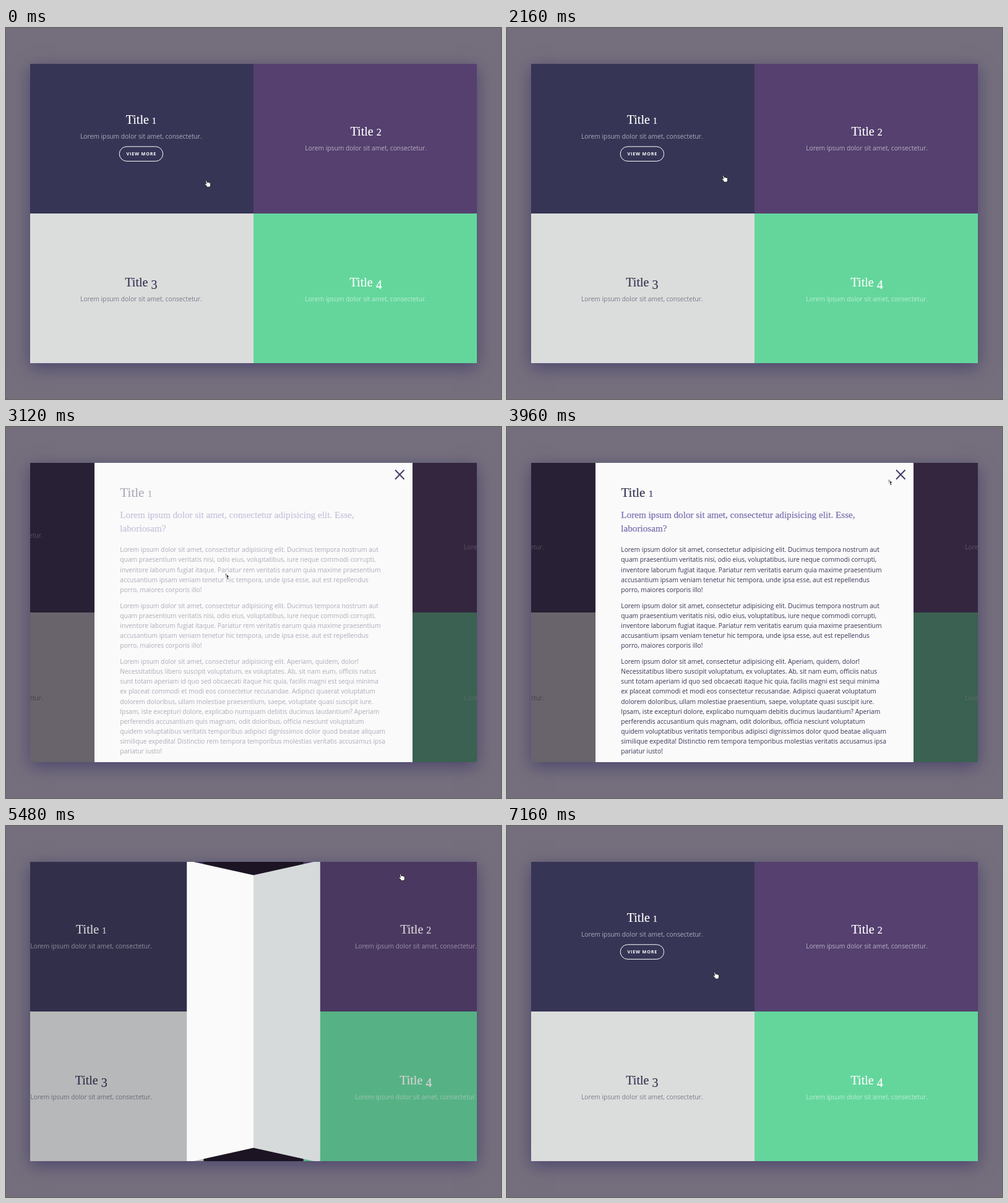
Recreate the animation shown at these times as an HTML page. Size 800 px wide and 600 px high, loop 7.36 s.

```html
<!DOCTYPE html>
<html lang="en">
<head>
<meta charset="utf-8">
<title>Folding panels</title>
<style>
  html, body { margin: 0; width: 100%; height: 100%; overflow: hidden; background: #756f7d; }
  #box {
    position: absolute; left: 39px; top: 58px; width: 722px; height: 484px;
    overflow: hidden; background: #1c1423;
    box-shadow: 0 7px 26px rgba(52, 44, 100, .62);
  }
  svg { display: block; }
  text { white-space: pre; }
  .title { font: 20px "Liberation Serif", serif; stroke-width: .2px; }
  .sub, .body { font: 10.28px "Open Sans", sans-serif; }
  .sub { fill-opacity: .58; }
  .btn text { font: 700 7.2px "Open Sans", sans-serif; letter-spacing: .85px; fill: #fff; }
  .mid { text-anchor: middle; }
  .body { fill: #373555; }
  .lead { font: 15.2px "Liberation Serif", serif; fill: #7b70b0; stroke: #7b70b0; stroke-width: .25px; }
</style>
</head>
<body>
<div id="box">
  <svg width="722" height="484" viewBox="39 58 722 484">
    <g id="left"></g>
    <g id="right"></g>
    <polygon id="flapL" fill="#fafafa"/>
    <polygon id="flapR"/>
    <g id="content"></g>
    <path id="cross" d="M629 69.5L643.5 84.5M643.5 69.5L629 84.5" stroke="#453c6a" stroke-width="2" fill="none"/>
    <path id="hand" fill="#fff" stroke="#111" stroke-width=".9" stroke-linejoin="round"
      d="M-3.4-4.6C-3.6-5.8-2-6-1.6-4.9L-.7-2.2C0-2.9.9-2.8 1.2-2.1C1.9-2.6 2.7-2.3 2.9-1.6C3.7-1.8 4.4-1.3 4.5-.4L4.7 2.2L4 5L-1 5.4L-2.4 3L-4.6.7C-5.1-.4-4-1-3.1-.3L-2.4.3Z"/>
    <path id="arrow" fill="#000" stroke="#fff" stroke-width=".7"
      d="M0 0V8.6L2-.1L2 6.7L3.4 10L5 9.3L3.6 6.2H6.4Z"/>
  </svg>
</div>
<script>
const LOOP = 7360, HALF = 257, MID = 400;
const $ = id => document.getElementById(id);
const clamp = v => Math.min(1, Math.max(0, v));

// CSS "ease": cubic-bezier(.25, .1, .25, 1)
function ease(x) {
  if (x <= 0) return 0;
  if (x >= 1) return 1;
  const bez = (a, b, s) => 3 * a * s * (1 - s) ** 2 + 3 * b * s * s * (1 - s) + s ** 3;
  let lo = 0, hi = 1;
  for (let i = 0; i < 24; i++) {
    const m = (lo + hi) / 2;
    if (bez(.25, .25, m) < x) lo = m; else hi = m;
  }
  return bez(.1, 1, lo);
}

// Old-style figures: 1 and 2 sit at x-height, 3 and 4 hang below the line
function title(n, x, y, fill, cls = '') {
  const style = n === 1 ? 'font-size=".72em"' : n === 2 ? 'font-size=".8em"' : 'dy="4"';
  return `<text class="title ${cls}" x="${x}" y="${y}" fill="${fill}" stroke="${fill}">Title <tspan ${style}>${n}</tspan></text>`;
}

function panel(n, bg, ink) {
  const x = n % 2 ? 39 : 400, y = n < 3 ? 58 : 300;
  const cx = n % 2 ? 218.4 : 581.6, dy = n < 3 ? 0 : 243.8;
  return `<rect x="${x}" y="${y}" width="361" height="242" fill="${bg}"/>
    <g id="text${n}">${title(n, cx, 174 + dy, ink, 'mid')}
    <text class="sub mid" x="${cx}" y="${198.2 + dy}" fill="${ink}">Lorem ipsum dolor sit amet, consectetur.</text></g>
    <g id="btn${n}" class="btn" opacity="0">
    <rect x="${cx - 35.2}" y="${191.8 + dy}" width="70.4" height="23.6" rx="11.8" fill="none" stroke="#fff"/>
    <text class="mid" x="${cx + .4}" y="${206.3 + dy}">VIEW MORE</text></g>`;
}

const shade = x => `<rect class="shade" x="${x}" y="58" width="361" height="484" fill="#1e1521"/>`;
$('left').innerHTML = panel(1, '#373555', '#fff') + panel(3, '#dbdddc', '#373555') + shade(39);
$('right').innerHTML = panel(2, '#55406f', '#fff') + panel(4, '#64d69c', '#fff') + shade(400);
const shades = document.querySelectorAll('.shade');

const para = `Lorem ipsum dolor sit amet, consectetur adipisicing elit. Ducimus tempora nostrum aut
quam praesentium veritatis nisi, odio eius, voluptatibus, iure neque commodi corrupti,
inventore laborum fugiat itaque. Pariatur rem veritatis earum quia maxime praesentium
accusantium ipsam veniam tenetur hic tempora, unde ipsa esse, aut est repellendus
porro, maiores corporis illo!`;
const longPara = `Lorem ipsum dolor sit amet, consectetur adipisicing elit. Aperiam, quidem, dolor!
Necessitatibus libero suscipit voluptatum, ex voluptates. Ab, sit nam eum, officiis natus
sunt totam aperiam id quo sed obcaecati itaque hic quia, facilis magni est sequi minima
ex placeat commodi et modi eos consectetur recusandae. Adipisci quaerat voluptatum
dolorem doloribus, ullam molestiae praesentium, saepe, voluptate quasi suscipit iure.
Ipsam, iste excepturi dolore, explicabo numquam debitis ducimus laudantium? Aperiam
perferendis accusantium quis magnam, odit doloribus, officia nesciunt voluptatum
quidem voluptatibus veritatis temporibus adipisci dignissimos dolor quod beatae aliquam
similique expedita! Distinctio rem tempora temporibus molestias veritatis accusamus ipsa
pariatur iusto!`;
const lead = `Lorem ipsum dolor sit amet, consectetur adipisicing elit. Esse,
laboriosam?`;
const lines = (str, cls, y, step) => str.split('\n')
  .map((s, i) => `<text class="${cls}" x="184.3" y="${y + i * step}">${s}</text>`).join('');
$('content').innerHTML =
  title(1, 184.5, 113, '#373555').replace('<text', '<text style="font-size:21px"') +
  lines(lead, 'lead', 147, 22.4) +
  lines(para, 'body', 202.4, 16.05) +
  lines(para, 'body', 292.8, 16.05) +
  lines(longPara, 'body', 383.3, 16.05);

// Pointer route: time, x, y
const route = [
  [0, 326, 252], [80, 326, 252], [160, 330, 250], [760, 330, 250], [920, 400, 232],
  [1080, 458, 216], [1240, 478, 210], [1360, 455, 218], [1480, 400, 234], [1680, 360, 243],
  [1880, 349, 245], [2080, 349, 245], [2160, 352, 244], [3100, 352, 244], [3300, 400, 215],
  [3600, 550, 128], [3800, 605, 96], [3960, 619, 89], [4360, 638, 82], [4560, 640, 83],
  [5480, 640, 83], [5640, 600, 95], [5960, 483, 141], [6240, 400, 190], [6500, 358, 225],
  [6840, 343, 239], [7160, 338, 242], [LOOP, 338, 242]
];
function pointer(t) {
  const i = route.findIndex(k => k[0] > t);
  const [a, b] = [route[i - 1], route[i]], u = (t - a[0]) / (b[0] - a[0]);
  return [a[1] + (b[1] - a[1]) * u, a[2] + (b[2] - a[2]) * u];
}

function setHover(n, h) {
  $('text' + n).setAttribute('transform', `translate(0 ${-19.5 * h})`);
  $('btn' + n).setAttribute('transform', `translate(0 ${38 * (1 - h)})`);
  $('btn' + n).setAttribute('opacity', h ** 6);
}

function setFlap(id, side, w) {
  const sin = Math.sqrt(1 - (w / HALF) ** 2);
  const inset = -2.4 + 28.1 * sin ** 1.65, x = MID + side * w;
  $(id).setAttribute('points',
    `${x},55.6 ${MID},${58 + inset} ${MID},${542 - inset} ${x},544.4`);
}

function draw(t) {
  const at = (start, dur = 400) => ease((t - start) / dur);
  setHover(1, clamp(1 - at(920) + at(1480) - at(3200) + at(6240)));
  setHover(2, clamp(at(920) - at(1480) + at(5800) - at(6240)));

  const closing = t >= 5320;
  const p = closing ? 1 - at(5320) : at(2320, 500);
  $('left').setAttribute('transform', `translate(${-HALF * p} 0)`);
  $('right').setAttribute('transform', `translate(${HALF * p} 0)`);
  shades.forEach(s => s.setAttribute('opacity', .6 * p));

  const r = closing ? p ** .75 : p, d = 1 - r;
  setFlap('flapL', -1, HALF * r);
  setFlap('flapR', 1, HALF * r);
  $('flapR').setAttribute('fill', `rgb(${250 - 61 * d},${250 - 55 * d},${250 - 53 * d})`);

  $('content').setAttribute('opacity', at(3000, 500) - at(4880));
  $('cross').setAttribute('opacity', at(2780, 280) - at(4880));

  const [x, y] = pointer(t), isArrow = t > 3100 && t < 4160;
  $('hand').setAttribute('visibility', isArrow ? 'hidden' : 'visible');
  $('arrow').setAttribute('visibility', isArrow ? 'visible' : 'hidden');
  $('hand').setAttribute('transform', `translate(${x} ${y})`);
  $('arrow').setAttribute('transform', `translate(${x - 2.3} ${y - 4.6})`);
}

const start = performance.now();
function tick() {
  draw((performance.now() - start) % LOOP);
  requestAnimationFrame(tick);
}
tick();
</script>
</body>
</html>
```
